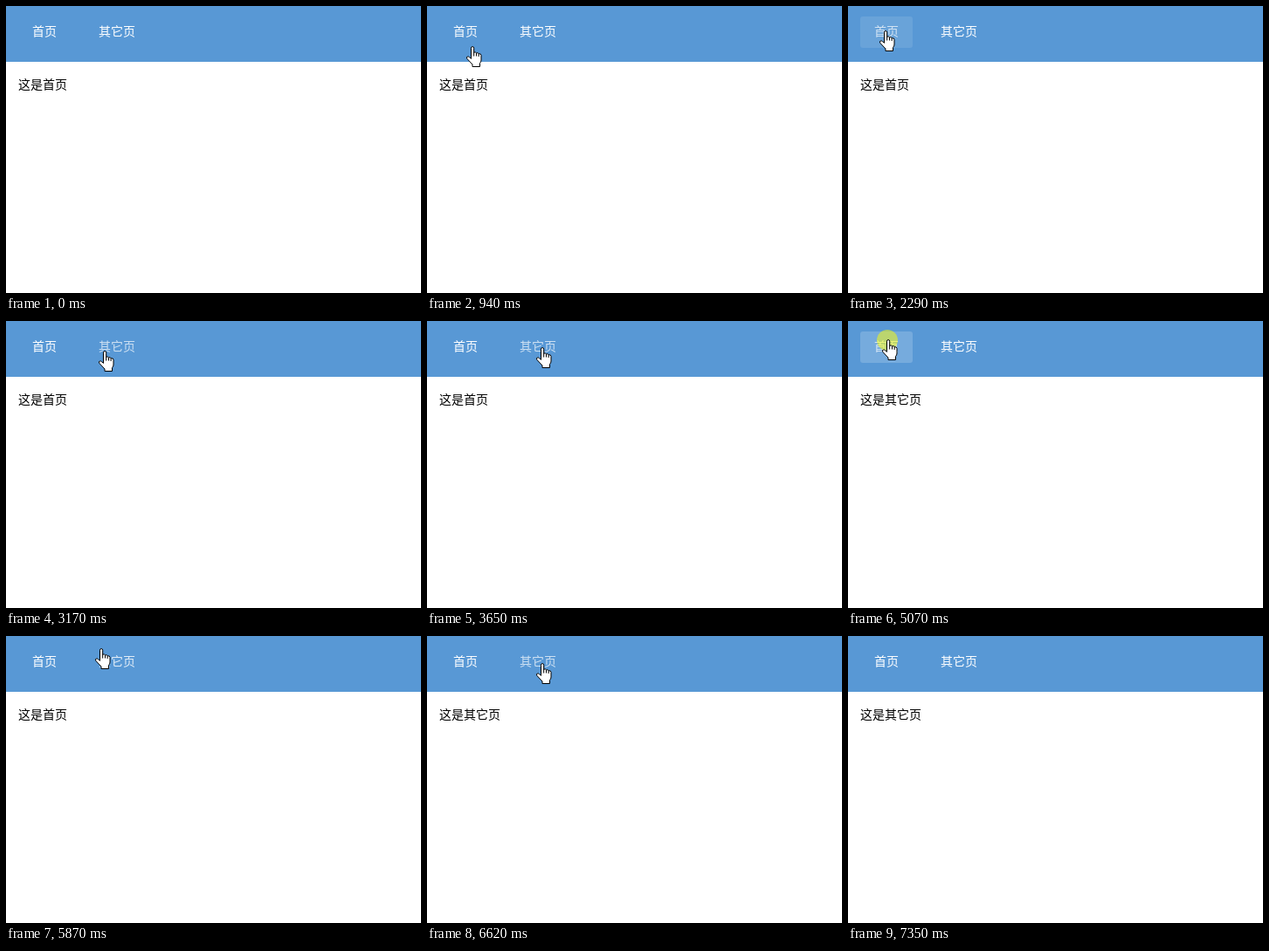
Write an HTML page that moves like this. It is 475 px wide and 329 px high and loops after 8010 ms.

```html
<!DOCTYPE html>
<html lang="zh-CN">
<head>
<meta charset="utf-8">
<style>
  html, body { margin: 0; width: 100%; height: 100%; overflow: hidden; background: #fff; }
  svg { display: block; font: 14px "Noto Sans CJK SC", "Noto Sans CJK", sans-serif; }
</style>
</head>
<body>
<svg width="475" height="329">
  <rect width="475" height="64" fill="#5898d5"/>
  <g id="nav" fill="#fff"></g>
  <text id="content" x="14" y="95"></text>
  <g id="pointer">
    <circle id="ring" r="12" fill="#ff0" fill-opacity=".5"/>
    <g fill="#fff" stroke="#000" stroke-linejoin="round">
      <g id="hand" transform="translate(-6 -1)">
        <path d="M5.5 2.2a1.6 1.6 0 0 1 3.2 0V7.2q1.6-.9 2.8.6q1.7-.7 2.6.9q2.9-.3 2.9 1.8V16q0 2-1.5 3.6V23.5H7V21L1 14.6q-1.2-1.9.2-2.6q1.2-.5 2.6.9L5.5 14.4Z"/>
        <path d="M8.7 7v4.5M11.5 8v3.5M14.1 9v3" fill="none"/>
      </g>
      <path id="arrow" d="M.5.5V16.5L4.2 13L6.7 18.5L9.2 17.4L6.8 12H11.8Z"/>
    </g>
  </g>
</svg>
<script>
const LOOP = 8010, FADE = 120;
const $ = id => document.getElementById(id);

const home = { name: '首页', x: 14, w: 60 };
const other = { name: '其它页', x: 90, w: 74 };
const links = [home, other];
for (const link of links) {
  $('nav').insertAdjacentHTML('beforeend',
    `<rect x="${link.x}" y="12" width="${link.w}" height="36" rx="3"/>
     <text x="${link.x + 16}" y="34">${link.name}</text>`);
  link.label = $('nav').lastElementChild;
  link.back = link.label.previousElementSibling;
}

// The pointer rests at a stop from "at" to "until", or passes through without "until"
const stops = [
  { at: 340, x: 176, y: 307 },
  { at: 1080, until: 2390, x: 42, y: 29 },
  { at: 2900, x: 98, y: 53 },
  { at: 3170, x: 112, y: 35 },
  { at: 3700, until: 4220, x: 131, y: 31 },
  { at: 5000, until: 5600, x: 45, y: 22 },
  { at: 5870, x: 108, y: 15 },
  { at: 6200, until: 6960, x: 131, y: 32 },
  { at: 7350, x: 295, y: 325 }
];
const clicks = [
  { down: 2080, up: 2230, link: home },
  { down: 3710, up: 3850, link: other },
  { down: 4990, up: 5170, link: home },
  { down: 6260, up: 6410, link: other }
];

function pointerAt(t) {
  const i = stops.findIndex(s => s.at > t);
  if (i < 1) return null;
  const a = stops[i - 1], b = stops[i], leave = a.until || a.at;
  const u = Math.max(0, (t - leave) / (b.at - leave)), v = 1 - u;
  // Ease only at the ends where the pointer rests
  const k = u * u * (3 - 2 * u) + (a.until ? 0 : u * v * v) - (b.until ? 0 : u * u * v);
  return { x: Math.round(a.x + (b.x - a.x) * k), y: Math.round(a.y + (b.y - a.y) * k) };
}

function hovers(t, link) {
  const p = pointerAt(t);
  return p && p.y >= 12 && p.y < 48 && p.x >= link.x && p.x < link.x + link.w;
}
const pressed = t => clicks.find(c => t >= c.down && t < c.up);

// A linear fade: the share of the last FADE ms in which the state held
function fade(t, state) {
  const n = 12;
  let on = 0;
  for (let i = 0; i < n; i++) if (state(t - i * FADE / n)) on++;
  return on / n;
}

const show = (id, on) => $(id).style.display = on ? '' : 'none';

function draw(t) {
  for (const link of links) {
    link.label.style.opacity = 1 - .3 * fade(t, s => hovers(s, link));
    link.back.style.opacity = .24 * fade(t, s => pressed(s)?.link === link);
  }
  const done = clicks.filter(c => c.up <= t).pop();
  $('content').textContent = '这是' + (done ? done.link : home).name;

  const p = pointerAt(t);
  show('pointer', p);
  if (!p) return;
  const onLink = links.some(link => hovers(t, link));
  $('pointer').setAttribute('transform', `translate(${p.x} ${p.y})`);
  show('hand', onLink);
  show('arrow', !onLink);
  show('ring', pressed(t));
}

const start = performance.now();
function tick() {
  draw((performance.now() - start) % LOOP);
  requestAnimationFrame(tick);
}
tick();
</script>
</body>
</html>
```
